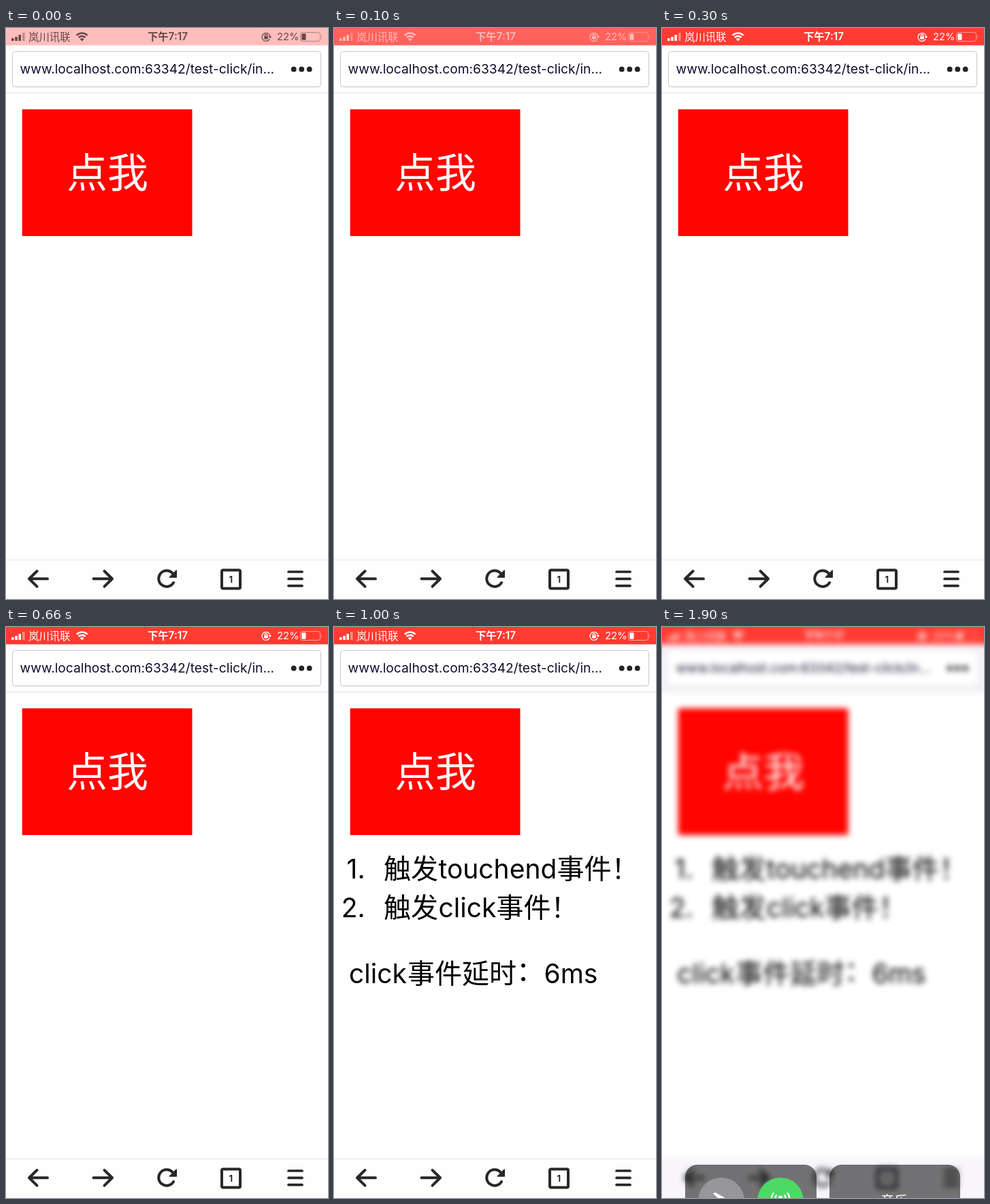
An HTML page that plays this animation: 473 px wide and 840 px high, repeating every 2000 ms.

```html
<!DOCTYPE html>
<html lang="zh-CN">
<head>
<meta charset="utf-8">
<title>Click delay test</title>
<style>
  html, body { margin: 0; width: 100%; height: 100%; overflow: hidden; background: #fff; }
  svg { display: block; width: 100vw; height: 100vh; font-family: Inter, "Noto Sans CJK SC", "Noto Sans CJK", sans-serif; }
  svg * { animation: 2s step-end infinite; }

  .screen { animation-name: defocus; }
  .status { animation-name: status-ink; fill: currentColor; font-size: 15px; }
  .status-bg { animation-name: status-bg; }
  .result { animation-name: result; font-size: 39px; }
  .cjk { font-size: 40px; }
  .panels { animation-name: panels; }
  .address { animation-name: address-bg; }
  .field { animation-name: field-edge; }
  .tools { animation-name: tools-bg; }
  .line { fill: none; stroke: #27272b; stroke-width: 4; stroke-linecap: round; stroke-linejoin: round; }
  .thin { fill: none; stroke: currentColor; }

  @keyframes status-bg {
    0% { fill: #ffbdbb; }
    5% { fill: #ff625d; }
    10% { fill: #ff4038; }
    15%, 100% { fill: #ff3b32; }
  }
  @keyframes status-ink {
    0% { color: #654847; }
    5% { color: #ffb9b6; }
    10% { color: #fff5f4; }
    15%, 100% { color: #fff; }
  }
  @keyframes result {
    0% { visibility: hidden; }
    45%, 100% { visibility: visible; }
  }
  @keyframes defocus {
    0% { filter: none; }
    95%, 100% { filter: blur(4px); }
  }
  @keyframes panels {
    0% { visibility: hidden; }
    95%, 100% { visibility: visible; }
  }
  @keyframes address-bg {
    0% { fill: #fff; }
    95%, 100% { fill: #f3f1f6; }
  }
  @keyframes field-edge {
    0% { stroke: #c8c8cc; }
    95%, 100% { stroke: #f3f1f6; }
  }
  @keyframes tools-bg {
    0% { fill: #fefefe; }
    95%, 100% { fill: #f8f6fa; }
  }
</style>
</head>
<body>
<svg viewBox="0 0 473 840">
  <g class="screen">
    <!-- Backgrounds overrun the stage so that the blur keeps solid edges -->
    <rect x="-20" y="-20" width="513" height="880" fill="#fff"/>

    <rect class="address" x="-20" y="25" width="513" height="70"/>
    <rect x="-20" y="95" width="513" height="1" fill="#dedee0"/>
    <rect class="status-bg" x="-20" y="-20" width="513" height="45.5"/>

    <g class="status">
      <rect x="8" y="15" width="3.6" height="4" rx=".7"/>
      <rect x="13.2" y="13" width="3.6" height="6" rx=".7"/>
      <rect x="18.4" y="10" width="3.6" height="9" rx=".7"/>
      <rect x="24" y="7" width="3.6" height="12" rx=".7" opacity=".4"/>
      <text x="33" y="18.7" font-size="15.4">岚川讯联</text>
      <g class="thin" stroke-width="2.5">
        <path d="M103.8 10.8a11 11 0 0 1 15.8 0"/>
        <path d="M106.7 14a7 7 0 0 1 10 0"/>
      </g>
      <path d="M108.7 16.2q3-2.4 6 0l-3 3.3z"/>
      <text x="208" y="18.3" font-size="15.3" font-weight="600">下午7:17</text>
      <g class="thin" stroke-width="1.3">
        <path d="M387.2 16.4a6 6 0 1 1 .8-3.4"/>
        <path d="M380.3 12.5v-1.3a1.7 1.7 0 0 1 3.4 0v1.3"/>
      </g>
      <rect x="379.2" y="12.2" width="5.6" height="4.2" rx=".6"/>
      <path d="M385.4 12.2h5l-2.5 3z"/>
      <text x="398" y="18.3" font-size="14.8">22%</text>
      <rect class="thin" x="432.5" y="6.5" width="29" height="13" rx="3" opacity=".5"/>
      <path d="M463 11q2 2 0 4z" opacity=".5"/>
      <rect x="434.3" y="8.3" width="6.2" height="9.4" rx="1.2"/>
    </g>

    <rect x="9.5" y="36" width="453" height="51.5" rx="4" fill="#000" opacity=".07"/>
    <rect class="field" x="9.5" y="34.5" width="453" height="52" rx="4" fill="#fff"/>
    <text x="20.5" y="67" font-size="19.2" fill="#150b2e">www.localhost.com:63342/test-click/in...</text>
    <g fill="#242427">
      <circle cx="422.7" cy="60.7" r="3.9"/>
      <circle cx="434.2" cy="60.7" r="3.9"/>
      <circle cx="445.7" cy="60.7" r="3.9"/>
    </g>

    <rect x="23.7" y="119.6" width="249.8" height="186.5" fill="#ff0400"/>
    <text x="149" y="234.5" font-size="60" fill="#fff" text-anchor="middle">点我</text>

    <g class="result">
      <text x="45.7" y="370" text-anchor="end">1.</text>
      <text y="370"><tspan class="cjk" x="73">触发</tspan><tspan x="153.5">touchend</tspan><tspan class="cjk" x="327.5">事件！</tspan></text>
      <text x="45.7" y="426.7" text-anchor="end">2.</text>
      <text y="426.7"><tspan class="cjk" x="73">触发</tspan><tspan x="153.5">click</tspan><tspan class="cjk" x="238.5">事件！</tspan></text>
      <text y="524"><tspan x="22">click</tspan><tspan class="cjk" x="108">事件延时<tspan dy="-4">：</tspan></tspan><tspan x="308.5" dy="4">6ms</tspan></text>
    </g>

    <rect class="tools" x="-20" y="783" width="513" height="80"/>
    <rect x="-20" y="782" width="513" height="1" fill="#e7e7e9"/>
    <g class="line">
      <path d="M61 810.3H34.5M45.5 799L34 810.3l11.5 11.3"/>
      <path d="M128.5 810.3H155M144.5 799L156 810.3l-11.5 11.3"/>
      <path d="M246 816a11.7 11.7 0 1 1-1.5-14"/>
      <rect x="317" y="797.5" width="27" height="27" rx="2"/>
      <path d="M415 800h20M415 810.3h20M415 820.6h20" stroke-width="3.7"/>
    </g>
    <path d="M250.3 798v10h-10z" fill="#27272b" stroke="#27272b" stroke-width="1.5" stroke-linejoin="round"/>
    <text x="330.3" y="815.5" font-size="13" font-weight="700" fill="#27272b" text-anchor="middle">1</text>
  </g>

  <g class="panels">
    <rect x="34" y="791" width="193" height="90" rx="18" fill-opacity=".54"/>
    <rect x="246" y="791" width="192" height="90" rx="18" fill-opacity=".54"/>
    <circle cx="87" cy="844" r="34" fill="#979799"/>
    <circle cx="174" cy="844" r="34" fill="#4cd964"/>
    <path d="M75 833.5l3-1.8 15 8.3H82z" fill="#fff"/>
    <g fill="none" stroke="#fff" stroke-width="2.2" stroke-linecap="round">
      <path d="M162.5 848a14 14 0 0 1 1-15M185.5 848a14 14 0 0 0-1-15"/>
      <path d="M167.5 845a8 8 0 0 1 .5-9M180.5 845a8 8 0 0 0-.5-9"/>
      <path d="M174 841v12"/>
    </g>
    <circle cx="174" cy="840" r="3.2" fill="#fff"/>
    <text x="341" y="851.5" font-size="20" fill="#fff" text-anchor="middle">音乐</text>
  </g>
</svg>
</body>
</html>
```
